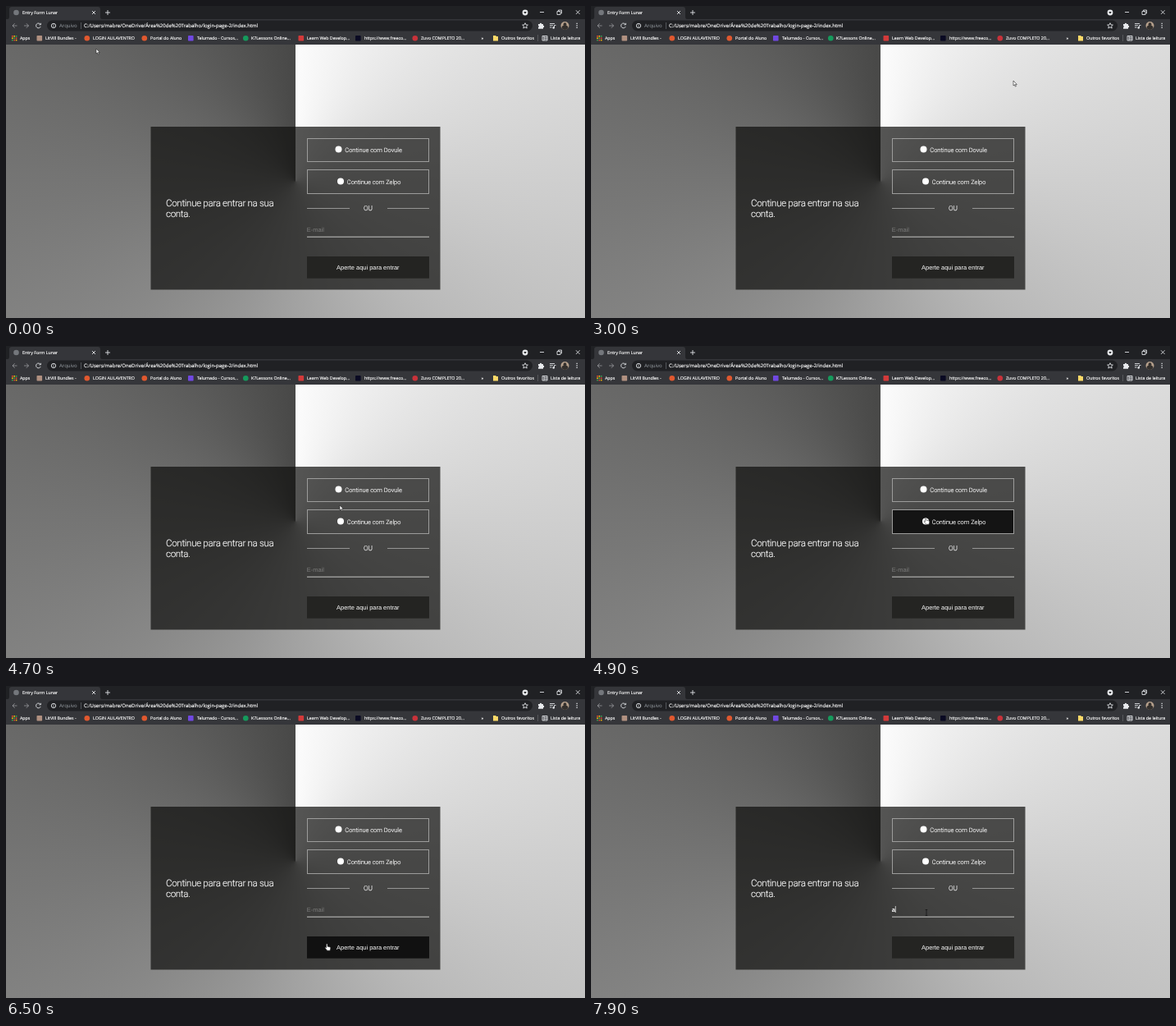
An HTML page for the animation above (8 s loop, 706 by 380 pixels).

```html
<!DOCTYPE html>
<html lang="pt-BR">
<head>
<meta charset="utf-8">
<title>Entry Form Lunar</title>
<style>
  html, body { margin: 0; width: 100%; height: 100%; overflow: hidden; background: #202124; }
  #page {
    position: absolute; inset: 47px 0 0;
    background: conic-gradient(#fcfcfc, #484847);
  }
  svg { position: absolute; inset: 0; width: 100%; height: 100%; display: block; }
  text { text-rendering: geometricPrecision; white-space: pre; }
  .ui { font: 5.3px "Open Sans", "Noto Sans", sans-serif; fill: #fff; }
  .ui text, .light text { stroke: #fff; stroke-width: .15; }
  .ui .muted { fill: #9aa0a6; stroke: none; }
  .url { font-size: 6.02px; }
  .light { font: 300 7.44px Roboto, sans-serif; fill: #fff; }
  .field { font: 7.44px "Liberation Sans", Arial, sans-serif; fill: #fff; }
  .line { fill: none; stroke: #dfe1e5; stroke-width: .9; }
  .option { fill: #141414; fill-opacity: 0; stroke: #9c9c9b; }
  .option.hover { fill-opacity: 1; }
  #submit { fill: #242422; }
  #submit.hover { fill: #111; }
  #email { fill: #7c7c7b; }
  #email.typed { fill: #fff; font-weight: bold; }
</style>
</head>
<body>
<div id="page"></div>
<svg viewBox="0 0 706 380">
  <!-- Browser window -->
  <g class="ui">
    <rect width="706" height="47" fill="#35363a"/>
    <rect width="706" height="16" fill="#202124"/>
    <path d="M2 16Q4 16 4 13V4Q4 1 7 1H112Q115 1 115 4V13Q115 16 117 16Z" fill="#35363a"/>
    <circle cx="12.5" cy="8" r="3.3" fill="#74777c"/>
    <text x="20" y="10">Entry Form Lunar</text>
    <path class="line" d="M105 6l4 4m0-4l-4 4M121 8h6m-3-3v6"/>
    <circle cx="633" cy="8" r="3.4" fill="#e8eaed"/>
    <path d="M631.2 7h3.6l-1.8 2.4z" fill="#202124"/>
    <path class="line" d="M651 7.5h5M672 6.5h4v4h-4zM673.5 6V5h4v4h-1M695 5.3l4.6 4.6m0-4.6l-4.6 4.6"/>

    <path class="line" d="M42 22.4a2.9 2.9 0 1 0 .2 2.7M42.4 20.8v2h-2"/>
    <path class="line" d="M13.5 24H8m2.7-2.8L8 24l2.7 2.8M22 24h5.5m-2.7-2.8l2.7 2.8l-2.7 2.8" stroke-opacity=".5"/>
    <rect x="50" y="17.5" width="592" height="13" rx="6.5" fill="#202124"/>
    <circle class="line" cx="58" cy="24" r="2.7" stroke-width=".7"/>
    <path class="line" d="M58 23.7v1.7m0-3.1v.7"/>
    <text class="url muted" x="65" y="26.2">Arquivo</text>
    <path d="M91.5 20v8" stroke="#6b6e73" stroke-width=".7"/>
    <text class="url" x="95" y="26.2">C:/Users/mabre/OneDrive/Área%20de%20Trabalho/login-page-2/index.html</text>
    <path class="line" stroke-width=".7" d="M633 20.7l1 2.2 2.4.2-1.8 1.6.6 2.4-2.2-1.3-2.2 1.3.6-2.4-1.8-1.6 2.4-.2z"/>
    <path d="M649 22h1.8a1.2 1.2 0 0 1 2.4 0h1.8v1.8a1.2 1.2 0 0 1 0 2.4v1.6h-6v-1.8a1.2 1.2 0 0 0 0-2.2z" fill="#e8eaed"/>
    <path class="line" d="M663 21.5h6M663 23.7h4M663 26h2.5M668.5 26.5v-3h2"/>
    <circle cx="667.7" cy="26.5" r="1.2" fill="#e8eaed"/>
    <circle cx="681.5" cy="24" r="5" fill="#b7a18d"/>
    <path d="M677.5 27a4 3.7 0 0 1 8 0a5 5 0 0 1-8 0z" fill="#34302d"/>
    <circle cx="681.5" cy="22.2" r="1.9" fill="#34302d"/>
    <path d="M695.5 20.8h1.3v1.3h-1.3zm0 2.5h1.3v1.3h-1.3zm0 2.5h1.3v1.3h-1.3z" fill="#e8eaed"/>

    <g id="bookmarks"></g>
    <text x="579.5" y="41">»</text>
    <path d="M594 36h3l1 1h2v5.5h-6z" fill="#fbd968"/>
    <text x="604" y="41">Outros favoritos</text>
    <path d="M648.5 35v8" stroke="#65676b" stroke-width=".7"/>
    <path class="line" d="M654 36.5h6v5.5h-6zM656 36.5v5.5M656 38.3h4m-4 1.9h4"/>
    <text x="664" y="41">Lista de leitura</text>
  </g>

  <!-- Login card -->
  <rect x="176.5" y="147" width="353" height="198.5" fill="#0f0f0d" fill-opacity=".7"/>
  <g class="light" style="font-size:11.6px;letter-spacing:-.33px">
    <text x="195" y="243.5">Continue para entrar na sua</text>
    <text x="195" y="257">conta.</text>
  </g>
  <g class="light">
    <rect class="option" id="first" x="367.5" y="161.5" width="148" height="28"/>
    <circle cx="405.5" cy="174.5" r="4" fill="#fff"/>
    <text x="413.3" y="177.8">Continue com Dovule</text>
    <rect class="option" id="second" x="367.5" y="199.5" width="148" height="29"/>
    <circle cx="408" cy="213.5" r="4" fill="#fff"/>
    <text x="415.8" y="216.8">Continue com Zelpo</text>
    <path d="M367 246.5h52m46 0h51" stroke="#959594"/>
    <text x="441.5" y="249.2" text-anchor="middle" style="font-size:8.27px">OU</text>
  </g>
  <g class="field">
    <text id="email" x="366.8" y="274.5"></text>
    <path id="caret" d="M0 268v8" stroke="#fff" stroke-width=".7"/>
    <path d="M367 281.2h149" stroke="#c4c4c3"/>
    <rect id="submit" x="367" y="305" width="149" height="26.7"/>
    <text x="441.3" y="320.6" text-anchor="middle">Aperte aqui para entrar</text>
  </g>

  <g id="pointer" stroke-linejoin="round">
    <path id="arrow" d="M0 0v6l1.4-1.2 1 2.3 1-.5-1-2.1h1.9z" fill="#fff" stroke="#222" stroke-width=".6"/>
    <path id="hand" d="M-.4.6q.7-1.2 1.4 0v2.6l3.2.8q.7.4.5 1.4l-.6 2.8H.7L-2 5q-.2-1 .7-.8l.9.8z" fill="#fff" stroke="#222" stroke-width=".5"/>
    <path id="beam" d="M-1.3-3.5h2.6M0-3.5v7M-1.3 3.5h2.6" fill="none" stroke="#111" stroke-width=".7"/>
  </g>
</svg>
<script>
const LOOP = 8000, STEP = 100;
const byId = id => document.getElementById(id);

// Bookmark bar: icon x, icon colour, text x, label, round icon
const bookmarks = [
  [37.5, '#b09080', 48, 'LitVill Bundles -', false],
  [95.5, '#e0582f', 106, 'LOGIN AULAVENTRO', true],
  [165.5, '#e0582f', 176, 'Portal do Aluno', true],
  [222, '#7048e0', 233, 'Telumado - Cursos...', false],
  [289, '#159a5c', 299, 'K7Lessons Online...', true],
  [356.5, '#d33a3a', 367, 'Learn Web Develop...', false],
  [426, '#0a0a23', 437, 'https://www.freeco...', false],
  [495.5, '#c8323a', 506, 'Zuvo COMPLETO 20...', true]
];
const appColors = ['#ea4335', '#fbbc05', '#34a853'];
const appDots = Array.from({ length: 9 }, (_, i) => {
  const column = i % 3, row = Math.floor(i / 3);
  return `<rect x="${7 + column * 2.4}" y="${36 + row * 2.4}" width="1.6" height="1.6" fill="${appColors[(column + row) % 3]}"/>`;
});
byId('bookmarks').innerHTML = appDots.join('') + '<text x="17" y="41">Apps</text>' +
  bookmarks.map(([x, color, textX, label, round]) =>
    `<rect x="${x}" y="36" width="6.6" height="6.6" rx="${round ? 3.3 : .8}" fill="${color}"/>
     <text x="${textX}" y="41">${label}</text>`).join('');

// Pointer path: time, x, y
const path = [
  [0, 110, 52], [400, 110, 52], [600, 400, 85], [800, 593, 220], [1000, 420, 366], [1200, 160, 270], [1300, 122, 181],
  [1500, 250, 49], [1800, 656, 150], [2000, 570, 339], [2200, 553, 62],
  [2600, 553, 62], [3000, 515, 91], [3100, 515, 91], [3400, 511, 94],
  [3500, 511, 94], [3600, 406, 101], [4000, 406, 101], [4200, 407, 149], [4500, 407, 178],
  [4600, 407, 178], [4700, 407, 194], [4900, 408, 209], [5200, 409, 252], [5500, 407, 231],
  [5900, 398, 308], [6400, 391, 314], [6500, 391, 314], [6900, 322, 245], [7100, 372, 214],
  [7300, 409, 237], [7600, 409, 276], [LOOP, 409, 276]
];

function pointerAt(time) {
  const next = path.findIndex(key => key[0] > time);
  const [t0, x0, y0] = path[next - 1], [t1, x1, y1] = path[next];
  const p = (time - t0) / (t1 - t0);
  return [x0 + (x1 - x0) * p, y0 + (y1 - y0) * p];
}

const show = (id, visible) => byId(id).style.display = visible ? '' : 'none';

function draw(time) {
  const [x, y] = pointerAt(time);
  const over = (top, bottom) => x >= 367 && x <= 516 && y >= top && y <= bottom;
  const hovers = { first: over(161, 190), second: over(199, 229), submit: over(305, 332) };
  for (const id in hovers) byId(id).classList.toggle('hover', hovers[id]);

  const onButton = Object.values(hovers).includes(true);
  const onField = over(262, 281);
  show('hand', onButton);
  show('beam', onField);
  show('arrow', !onButton && !onField);
  byId('pointer').setAttribute('transform', `translate(${x} ${y})`);

  const typed = time >= 7900;
  byId('email').textContent = typed ? 'a' : 'E-mail';
  byId('email').classList.toggle('typed', typed);
  show('caret', time >= 7600);
  byId('caret').setAttribute('transform', `translate(${typed ? 371.3 : 367} 0)`);
}

function tick() {
  draw(Math.floor(performance.now() % LOOP / STEP) * STEP);
  requestAnimationFrame(tick);
}
tick();
</script>
</body>
</html>
```
